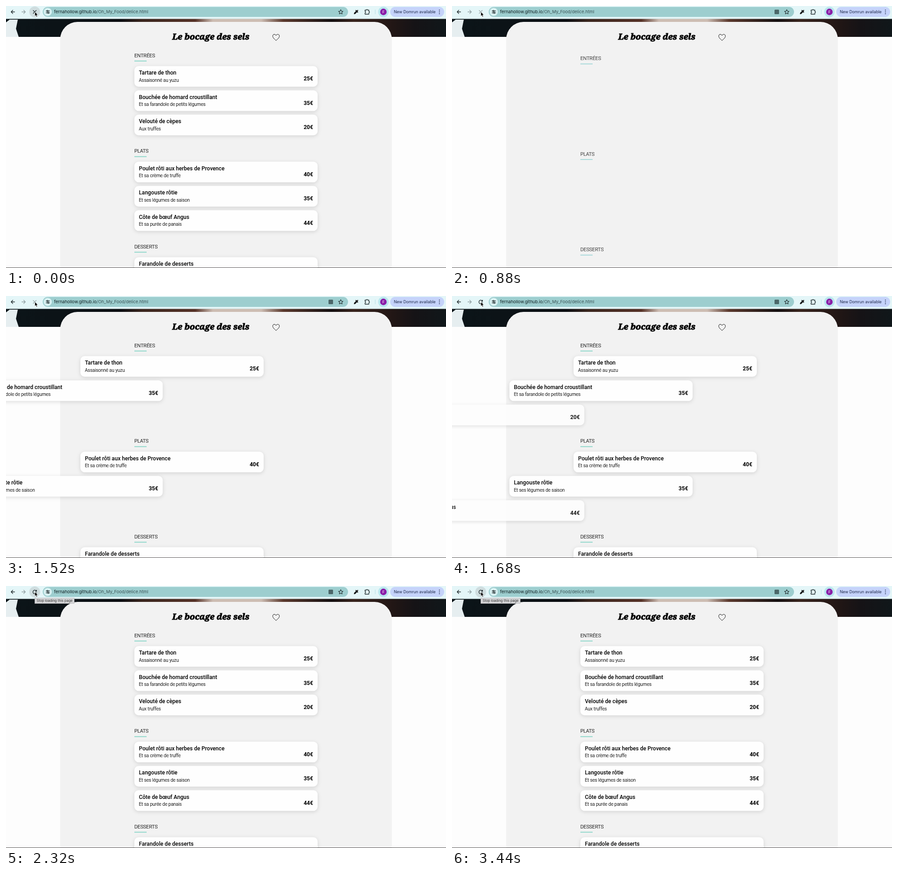
Animation of 970 by 577 pixels, one loop 3.52 s. Source, as an HTML page:

```html
<!DOCTYPE html>
<html lang="fr">
<head>
<meta charset="utf-8">
<title>Menu</title>
<style>
  html, body { margin: 0; width: 100%; height: 100%; overflow: hidden; background: #fdfdfd; }
  svg { display: block; width: 970px; height: 577px; }
  text { font-family: Roboto, sans-serif; white-space: pre; }
  .bar text { font-family: Inter, sans-serif; }
  .line { fill: none; stroke: #1f2a2c; stroke-width: 1.3; stroke-linecap: round; stroke-linejoin: round; }
  .brand { font: italic 900 18.6px "Noto Serif", serif; stroke: #000; stroke-width: 1; }
  .head, .note { font-weight: 300; stroke: #000; stroke-width: .2; }
  .head { font-size: 10.8px; }
  .note { font-size: 10.1px; }
  .dish { font-size: 12.13px; font-weight: 500; }
  .price { font-size: 12.13px; font-weight: 700; }
  .box { fill: #fefefe; filter: drop-shadow(0 2.5px 4px rgba(0, 0, 0, .13)); }
</style>
</head>
<body>
<svg viewBox="0 0 970 577">
  <defs>
    <linearGradient id="photo">
      <stop offset="0" stop-color="#0b1418"/>
      <stop offset=".12" stop-color="#0c1317"/>
      <stop offset=".26" stop-color="#0b0d11"/>
      <stop offset=".31" stop-color="#3a251d"/>
      <stop offset=".43" stop-color="#553126"/>
      <stop offset=".47" stop-color="#cdbdb3"/>
      <stop offset=".58" stop-color="#cdbdb3"/>
      <stop offset=".63" stop-color="#5a382c"/>
      <stop offset=".74" stop-color="#140f10"/>
      <stop offset=".79" stop-color="#38231c"/>
      <stop offset=".88" stop-color="#211615"/>
      <stop offset=".93" stop-color="#151316"/>
      <stop offset="1" stop-color="#10171a"/>
    </linearGradient>
  </defs>

  <rect y="28" width="970" height="40" fill="url(#photo)"/>
  <path d="M0 36L8 30H26L22 50L28 68H0z" fill="#e6eef0"/>
  <path d="M119.500 577V73a38 38 0 0 1 38-38H812.500a38 38 0 0 1 38 38V577z" fill="#f2f2f2"/>
  <text class="brand" x="451.500" y="74" text-anchor="middle">Le bocage des sels</text>
  <path d="M595.300 76C591 72 588 69.800 588 66.300C588 61.500 593.500 61 595.300 65C597 61 602.700 61.500 602.700 66.300C602.700 69.800 599.500 72 595.300 76z" fill="none" stroke="#111"/>
  <g id="menu"></g>
  <rect y="576" width="970" height="1" fill="#4d4a4b"/>

  <g class="bar">
    <rect width="970" height="28" fill="#e4f6f8"/>
    <rect y="27.500" width="970" height="1" fill="#d3e6e8"/>
    <path class="line" d="M19 13H11.500M15 9.300L11.300 13L15 16.700"/>
    <path class="line" d="M35 13H42.500M39 9.300L42.700 13L39 16.700" style="stroke:#91a0a3"/>
    <circle id="hover" cx="63.300" cy="13" r="12" fill="#cfdddf"/>
    <path id="stop" class="line" d="M60 9.700L66.600 16.300M66.600 9.700L60 16.300"/>
    <g id="reload">
      <path class="line" d="M66.700 11A4 4 0 1 0 67.200 14.300"/>
      <path d="M68 8V12.300H63.700z" fill="#1f2a2c"/>
    </g>

    <rect x="81" y="2" width="673" height="22" rx="11" fill="#9dcecf"/>
    <circle cx="92" cy="13" r="9" fill="#d8f0f1"/>
    <path class="line" d="M88.500 11H90M93.500 11H96M88.500 15H91M94.500 15H96"/>
    <circle class="line" cx="91.500" cy="11" r="1.300"/>
    <circle class="line" cx="93" cy="15" r="1.300"/>
    <text x="106" y="16.300" font-size="9.500" fill="#0d1d1f">fernahollow.github.io<tspan fill="#375153">/Oh_My_Food/delice.html</tspan></text>
    <rect id="lang" x="711" y="8" width="10" height="10" rx="1.500" fill="#4b6769"/>
    <path class="line" d="M738 8L739.500 11.300L743 11.700L740.400 14L741.100 17.500L738 15.700L734.900 17.500L735.600 14L733 11.700L736.500 11.300z" style="stroke-width:1.100"/>
    <path d="M767 18L767.500 15L771.500 11L774 13.500L770 17.500z" fill="#111"/>
    <path d="M771.500 9.800L775.200 13.500M773.500 11.500L775.300 9.700" stroke="#111" stroke-width="2.200" stroke-linecap="round"/>
    <path class="line" d="M791.500 9H794.500A1.400 1.400 0 0 1 797.300 9H800V12A1.400 1.400 0 0 1 800 14.800V18H791.500V15A1.500 1.500 0 0 0 791.500 12z"/>
    <rect x="813.500" y="8" width="1" height="10" fill="#b4dee3"/>
    <circle cx="832" cy="13" r="11.500" fill="#b9e6ee"/>
    <circle cx="832" cy="13" r="7.200" fill="#8a1fa8"/>
    <text x="832" y="16" font-size="8" fill="#fff" text-anchor="middle">F</text>
    <rect x="847" y="2" width="119" height="22" rx="11" fill="#c5d3fa"/>
    <text x="855" y="16.200" font-size="8.700" fill="#1c2748">New Domrun available</text>
    <g fill="#1c2748">
      <circle cx="955.500" cy="9" r="1"/><circle cx="955.500" cy="13" r="1"/><circle cx="955.500" cy="17" r="1"/>
    </g>

    <g id="tip">
      <rect x="63.500" y="26.500" width="87" height="12" fill="#d6d6d8" stroke="#b5b5b8" stroke-width=".7"/>
      <text x="67.500" y="35.300" font-size="7.500" fill="#333">Stop loading this page</text>
    </g>
    <path d="M63.700 13V22.300L65.800 20.400L67.300 23.900L69 23.200L67.500 19.800H70.300z" fill="#000" stroke="#fff" stroke-width=".7"/>
  </g>
</svg>
<script>
const LOOP = 3520, STEP = 80, RENEW = 480;
const $ = id => document.getElementById(id);
const menu = [
  ["ENTRÉES",
    ["Tartare de thon", "Assaisonné au yuzu", "25€"],
    ["Bouchée de homard croustillant", "Et sa farandole de petits légumes", "35€"],
    ["Velouté de cèpes", "Aux truffes", "20€"]],
  ["PLATS",
    ["Poulet rôti aux herbes de Provence", "Et sa crème de truffe", "40€"],
    ["Langouste rôtie", "Et ses légumes de saison", "35€"],
    ["Côte de bœuf Angus", "Et sa purée de panais", "44€"]],
  ["DESSERTS", ["Farandole de desserts", "", ""]]
];

const card = ([dish, note, price], i) => `<g class="card" data-row="${i}">
  <g transform="translate(283 ${132.2 + i * 53.5})">
    <rect class="box" width="404" height="45.5" rx="9.5"/>
    <text class="dish" x="10" y="19.2">${dish}</text>
    <text class="note" x="10" y="34.7">${note}</text>
    <text class="price" x="394" y="32.3" text-anchor="end">${price}</text>
  </g></g>`;

$("menu").innerHTML = menu.map(([title, ...dishes], i) => `<g transform="translate(0 ${i * 210.5})">
  <g class="title">
    <text class="head" x="283" y="112.7">${title}</text>
    <rect class="rule" x="283" y="120.2" width="27" height="2"/>
  </g>${dishes.map(card).join("")}</g>`).join("");

const cards = document.querySelectorAll(".card");
const titles = document.querySelectorAll(".title");
const rules = document.querySelectorAll(".rule");

// CSS-like cubic Bézier timing, solved by bisection
function bezier(x1, y1, x2, y2) {
  const at = (a, b, u) => 3 * a * u * (1 - u) ** 2 + 3 * b * u * u * (1 - u) + u ** 3;
  return p => {
    if (p <= 0 || p >= 1) return p <= 0 ? 0 : 1;
    let lo = 0, hi = 1;
    for (let i = 0; i < 24; i++) {
      const mid = (lo + hi) / 2;
      if (at(x1, x2, mid) < p) lo = mid; else hi = mid;
    }
    return at(y1, y2, lo);
  };
}
const ease = bezier(.25, .1, .25, 1), easeOut = bezier(0, 0, .58, 1);
const clamp = v => Math.max(0, Math.min(1, v));
const show = (id, on) => $(id).style.display = on ? "" : "none";

function draw(t) {
  const fresh = t >= RENEW, age = t - RENEW;
  const rise = fresh ? ease(age / 1000) : 1;
  titles.forEach(el => {
    el.setAttribute("transform", `translate(0 ${20 * (1 - rise)})`);
    el.setAttribute("opacity", clamp(1.25 * rise));
  });
  const tint = [[165, 145], [210, 216], [225, 203]].map(([a, b]) => a + (b - a) * rise ** 2);
  rules.forEach(el => el.setAttribute("fill", `rgb(${tint})`));
  cards.forEach(el => {
    const p = fresh ? (age - 542 - 200 * el.dataset.row) / 735 : 1;
    el.setAttribute("transform", `translate(${-808 * (1 - easeOut(p))} 0)`);
    el.setAttribute("opacity", clamp(4.5 * (p - .15)));
  });

  const loaded = t >= 1600;
  show("stop", !loaded);
  show("reload", loaded);
  $("stop").style.stroke = fresh ? "#98a6a8" : "#1f2a2c";
  show("hover", !fresh || t >= 1760);
  show("lang", t >= 640);
  show("tip", t >= 2240);
}

const start = performance.now();
function tick() {
  const t = (performance.now() - start) % LOOP;
  draw(Math.floor(t / STEP) * STEP);
  requestAnimationFrame(tick);
}
draw(0);
requestAnimationFrame(tick);
</script>
</body>
</html>
```
